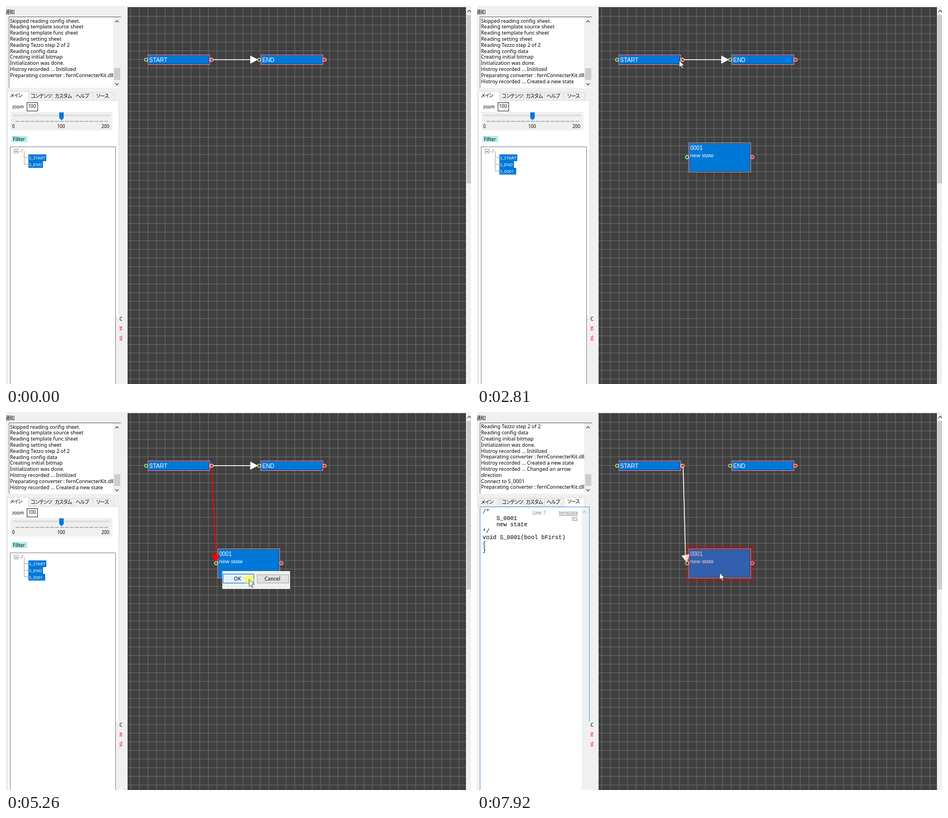
An HTML page for the animation above (8 s loop, 830 by 675 pixels).

```html
<!DOCTYPE html>
<html lang="ja">
<head>
<meta charset="utf-8">
<title>State editor</title>
<style>
html, body { margin: 0; width: 830px; height: 675px; overflow: hidden; background: #f0f0f0; }
svg { display: block; }
text { font-family: "Noto Sans", "Open Sans", sans-serif; font-size: 9px; fill: #000; white-space: pre; }
rect, line { shape-rendering: crispEdges; }
.jp { font-family: "Noto Sans CJK JP", "Noto Sans CJK", sans-serif; font-feature-settings: "palt"; letter-spacing: -.6px; }
.node { font-family: "Liberation Sans", Arial, sans-serif; fill: #fff; }
.code { font-family: "Liberation Mono", "DejaVu Sans Mono", monospace; }
.sel { fill: #fff; }
.root { fill: #e03020; }
.dim { fill: #777; }
.link { fill: #777; text-decoration: underline; }
.warn { fill: #f00; text-decoration: underline; }
</style>
</head>
<body>
<svg id="stage" width="830" height="675" viewBox="0 0 830 675"></svg>
<script>
const LOOP = 8000;
const BLUE = '#0078d7';
const LINE = 10.8;
const CELL = 15.42;

// Markup helpers
const rect = (x, y, w, h, fill, more = '') =>
  `<rect x="${x}" y="${y}" width="${w}" height="${h}" fill="${fill}" ${more}/>`;
const frame = (x, y, w, h, fill, stroke) =>
  rect(x + .5, y + .5, w - 1, h - 1, fill, `stroke="${stroke}"`);
const text = (x, y, s, size = 9, cls = '', more = '') =>
  `<text x="${x}" y="${y}" class="${cls}" style="font-size:${size}px" ${more}>${s}</text>`;
const path = (d, stroke, w = 1, fill = 'none') =>
  `<path d="${d}" fill="${fill}" stroke="${stroke}" stroke-width="${w}"/>`;
const group = (id, body) => `<g id="${id}">${body}</g>`;
const port = (x, y, fill) =>
  `<circle cx="${x}" cy="${y}" r="3" fill="${fill}" stroke="#fff"/>`;

// lean turns the head away from the direction of the line
function arrow(x1, y1, x2, y2, color, w, lean = 0) {
  const a = Math.atan2(y2 - y1, x2 - x1) - lean, c = Math.cos(a), s = Math.sin(a);
  const bx = x2 - 14 * c, by = y2 - 14 * s, h = 7.3;
  return path(`M${x1} ${y1}L${bx} ${by}`, color, w) +
    `<path fill="${color}" d="M${x2} ${y2}L${bx - h * s} ${by + h * c}L${bx + h * s} ${by - h * c}Z"/>`;
}

function node(x, y, w, h, border, label) {
  const mid = y + (h > 30 ? 26 : 9);
  return frame(x, y, w, h, BLUE, border) + frame(x + 1, y + 1, w - 2, h - 2, BLUE, '#10406e') +
    label + port(x - 3, mid, '#008000') + port(x + w + 2.5, mid, '#f00');
}

function grid() {
  let d = '';
  for (let x = 222.5; x < 821; x += CELL) d += `M${x} 2V675`;
  for (let y = 18.4; y < 675; y += CELL) d += `M217 ${y}H821`;
  return rect(217, 2, 604, 673, '#404040') + path(d, '#6b6b6b');
}

// Left column
const LIB = 'Preparating converter : fernConnecterKit.dll';
const LOG = [
  'Skipped reading config sheet.', 'Reading template source sheet',
  'Reading template func sheet', 'Reading setting sheet',
  'Reading Tezzo step 2 of 2', 'Reading config data', 'Creating initial bitmap',
  'Initialization was done.', 'Histroy recorded ... Initilized', LIB,
  'Histroy recorded ... Created a new state', 'Histroy recorded ... Changed an arrow',
  'direction', 'Connect to S_0001', LIB
];

const logBox = () =>
  text(-2, 13.5, '通知', 9, 'jp') +
  rect(5, 19, 200, 127, '#fff') + rect(5, 19, 200, 1, '#696969') + rect(5, 19, 1, 127, '#808080') +
  rect(191, 20, 14, 125, '#f0f0f0') + rect(193, 111, 11, 21, '#cdcdcd') +
  path('M195 29l3-3 3 3M195 138l3 3 3-3', '#505050', 1.3) +
  `<g clip-path="url(#logClip)">${group('log',
    LOG.map((s, i) => text(7, 29.5 + i * LINE, s, 9)).join(''))}</g>` +
  rect(7, 128, 1, 11, '#000', 'id="caret"');

const TABS = [['メイン', 2, 7], ['コンテンツ', 40, 44], ['カスタム', 83, 87],
  ['ヘルプ', 120, 124], ['ソース', 155, 161], ['', 192]];

function tabs(active) {
  let s = '';
  for (let i = 0; i < 5; i++) {
    const [name, x, tx] = TABS[i], w = TABS[i + 1][1] - x, on = i === active;
    s += (on ? frame(x, 152, w + 1, 18, '#fff', '#dcdcdc') + rect(x + 1, 168, w - 1, 2, '#fff')
             : frame(x, 154, w + 1, 15, '#f0f0f0', '#d9d9d9')) +
      text(tx, on ? 163 : 164, name, 9, 'jp');
  }
  return s;
}

const treeRow = (y, name, w) =>
  path(`M32.5 ${y - 6}V${y + 6}M33 ${y + 5.5}H40`, '#aaa') +
  rect(40, y, w, 12, BLUE) + text(41, y + 8.7, name, 7.6, 'sel');

const mainPage = () =>
  frame(2, 168, 200, 520, '#fff', '#dcdcdc') + tabs(0) +
  text(11, 183, 'zoom', 8) + frame(37, 172, 20, 16, '#fff', '#333') + text(39.5, 182, '100', 8) +
  rect(8, 189, 182, 33, '#f0f0f0') + frame(13, 194, 172, 3, '#e7eaea', '#d6d6d6') +
  `<path d="M17 206H182" stroke="#b8b8b8" stroke-width="2" stroke-dasharray="7 1.8"/>` +
  `<path d="M95 190h8v10l-4 4-4-4z" fill="${BLUE}"/>` +
  text(11, 217.5, '0', 8) + text(91.5, 218, '100', 8) + text(170.5, 217.5, '200', 8) +
  rect(10, 232, 28, 11, '#afeeee') + text(12.5, 240.5, 'Fillter', 8) +
  rect(196, 553, 12, 122, '#f0f0f0') +
  frame(7, 251, 189, 440, '#fff', '#828790') +
  frame(14, 255, 8, 8, '#fff', '#a0a0a0') + rect(16, 259, 4, 1, '#555') + rect(23, 259, 3, 1, '#bbb') +
  text(27, 262, '/', 9, 'root') +
  treeRow(265, 'S_START', 32) + treeRow(277, 'S_END', 26) +
  group('row', treeRow(289, 'S_0001', 30));

const CODE = [[0, '/*'], [4, 'S_0001'], [4, 'new state'], [0, '*/'],
  [0, 'void S_0001(bool bFirst)'], [0, '{'], [0, '}']];

const sourcePage = () =>
  rect(0, 147, 208, 528, '#f0f0f0') + tabs(4) +
  frame(5, 169, 196, 520, '#fff', '#569de5') +
  rect(187, 170, 13, 505, '#f0f0f0') + path('M189 180l3-3 3 3', '#bbb', 1.3) +
  rect(196, 553, 12, 122, '#f0f0f0') +
  group('code', CODE.map(([n, s], i) =>
    text(10 + n * 6.17, 181 + i * 11.55, s, 10.28, 'code')).join('') +
    text(99, 183, 'Line :?', 8, 'dim') +
    text(180, 183, 'template', 8, 'link', 'text-anchor="end"') +
    text(180, 192, 'src', 8, 'link', 'text-anchor="end"'));

const edge = () => rect(196, 559, 5, 1, '#dcdcdc') +
  `<g clip-path="url(#edgeClip)">${text(202.5, 562, 'C')}${text(202.5, 577, 'w', 9, 'warn')}${
    text(202.5, 595, 'd', 9, 'warn')}</g>`;

// Diagram
const dialog = () => rect(386, 284, 121, 32, '#f0f0f0') +
  frame(387, 289, 56, 17, '#e1e1e1', BLUE) +
  group('okHot', rect(388, 290, 54, 15, '#e5f1fb')) +
  text(413, 300.5, 'OK', 9, '', 'text-anchor="middle"') +
  frame(448, 290, 57, 16, '#e1e1e1', '#adadad') +
  text(475.5, 300.5, 'Cancel', 9, '', 'text-anchor="middle"');

document.getElementById('stage').innerHTML =
  `<clipPath id="logClip"><rect x="6" y="20" width="185" height="125"/></clipPath>
   <clipPath id="edgeClip"><rect x="196" y="550" width="11.5" height="60"/></clipPath>` +
  rect(0, 0, 830, 675, '#f0f0f0') + logBox() + mainPage() + group('source', sourcePage()) + edge() +
  grid() +
  rect(822, 16, 8, 301, '#cdcdcd') + path('M823.5 11l3.5-3.5 3.5 3.5', '#505050', 1.3) +
  group('toEnd', arrow(370, 95.8, 450, 95.8, '#fff', 1.5)) +
  node(253, 87, 111, 18, '#f28ccb', text(255.3, 99.6, 'START', 10.3, 'node')) +
  node(455, 87, 111, 18, '#f28ccb', text(457.3, 99.6, 'END', 10.3, 'node')) +
  group('fresh', node(378, 244, 111, 53, '#c9a9b4',
    text(380.5, 256.5, '0001', 10, 'node') + text(380.5, 270, 'new state', 9.8, 'node'))) +
  group('drag', '') +
  group('linked', arrow(368, 98, 375, 269, '#fff', 1.5, .17)) +
  port(367, 96, '#f00') + group('freshPort', port(375, 270, '#008000')) +
  group('glow', rect(372, 237, 124, 67, '#f00', 'opacity=".2"')) +
  group('dialog', dialog()) +
  group('press', '<circle r="9" fill="#ff0" opacity=".5"/>') +
  group('cursor', path('M0 0V12.6L2.9 9.9 4.9 14.6 6.9 13.7 4.9 9.2H9Z', '#111', .7, '#fff'));

// Times in ms at which each part shows
const SHOW = {
  cursor: [[50, LOOP]],
  row: [[2050, LOOP]], fresh: [[2050, LOOP]], freshPort: [[2050, LOOP]],
  toEnd: [[0, 5520]], drag: [[3260, 5520]], linked: [[5520, LOOP]],
  dialog: [[3930, 5380]], okHot: [[4390, 4620], [4860, 5380]],
  press: [[3190, 3930], [5190, 5380], [7200, 7330]],
  glow: [[7200, LOOP]], source: [[7300, LOOP]], code: [[7660, LOOP]]
};

// Log view: start time, first line, end line
const VIEWS = [[0, 0, 10], [2050, 0, 11], [5520, 3, 14], [7400, 4, 15]];

// Pointer path: time, x, y
const MOVES = [
  [50, 679, 598], [500, 520, 290], [720, 385, 136], [850, 346, 182], [920, 333, 214],
  [1130, 333, 214], [1200, 346, 220], [1300, 346, 220], [1390, 371, 235], [1570, 371, 235],
  [1600, 374, 236], [1980, 374, 236], [2740, 360, 104], [2810, 361, 97], [3000, 366, 97],
  [3190, 366, 97], [3860, 387, 284], [4000, 387, 284], [4120, 391, 283], [4320, 391, 283],
  [4740, 466, 297], [5120, 434, 299], [5380, 434, 299], [5600, 437, 305], [6020, 434, 303],
  [6300, 507, 318], [6600, 405, 326], [6810, 387, 327], [6850, 387, 327], [7200, 433, 287]
];

function pointer(t) {
  const i = MOVES.findIndex(m => m[0] > t);
  if (i === 0) return MOVES[0].slice(1);
  if (i < 0) return MOVES[MOVES.length - 1].slice(1);
  const [t0, x0, y0] = MOVES[i - 1], [t1, x1, y1] = MOVES[i], k = (t - t0) / (t1 - t0);
  return [x0 + (x1 - x0) * k, y0 + (y1 - y0) * k];
}

const el = id => document.getElementById(id);
const show = (part, on) => part.setAttribute('display', on ? 'inline' : 'none');
const parts = Object.keys(SHOW).map(id => [el(id), SHOW[id]]);
const log = el('log'), caret = el('caret'), cursor = el('cursor'), press = el('press'), drag = el('drag');

function draw(t) {
  for (const [part, spans] of parts) show(part, spans.some(([a, b]) => t >= a && t < b));

  const [, first, end] = VIEWS.filter(v => t >= v[0]).pop();
  log.setAttribute('transform', `translate(0 ${-first * LINE})`);
  [...log.children].forEach((line, i) => show(line, i >= first && i < end));

  show(caret, t >= 1300 && t < 7000 && Math.floor((t - 150) / 530) % 2 === 0);
  caret.setAttribute('y', t < 2050 ? 128 : 139);
  caret.setAttribute('height', t < 2050 ? 11 : 6);

  const [x, y] = pointer(t).map(Math.round);
  cursor.setAttribute('transform', `translate(${x} ${y})`);
  press.setAttribute('transform', `translate(${x} ${y})`);

  // The dragged line snaps to the port once the pointer is over the node
  const tip = t > 3700 || y > 244 ? [375.3, 269] : [x, y];
  drag.innerHTML = arrow(367, 98, ...tip, '#f00', 1.7);
}

const start = performance.now();
function tick() {
  draw((performance.now() - start) % LOOP);
  requestAnimationFrame(tick);
}
draw(0);
requestAnimationFrame(tick);
</script>
</body>
</html>
```
